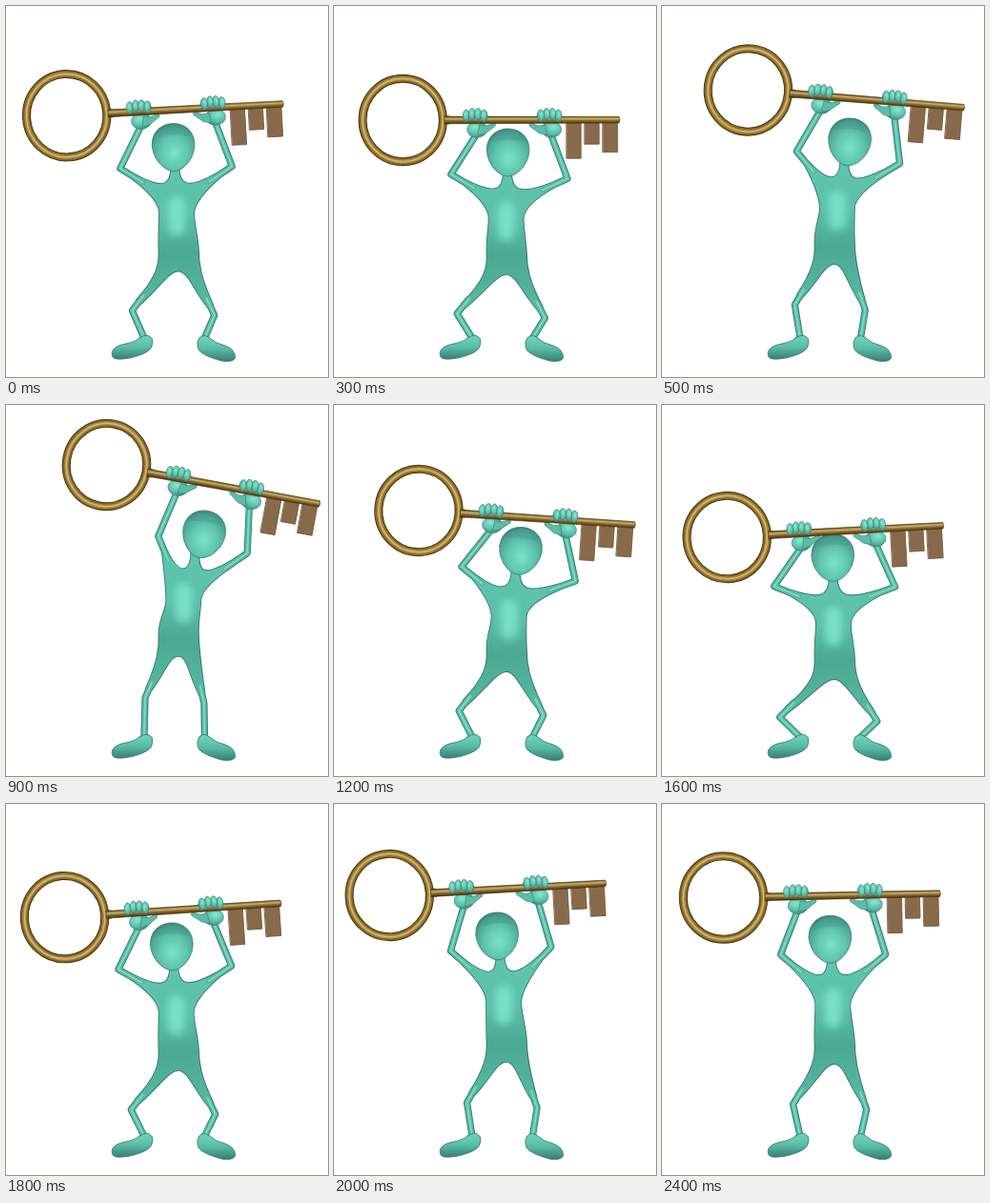
Animation, 338 px wide and 390 px high, one loop 2500 ms. Source, as an HTML page:

```html
<!DOCTYPE html>
<html lang="en">
<head>
<meta charset="utf-8">
<title>Figure lifting a key</title>
<style>
html, body { margin: 0; width: 100%; height: 100%; overflow: hidden; background: #fff; }
svg { display: block; width: 100vw; height: 100vh; }
path, ellipse { stroke-linecap: round; stroke-linejoin: round; }
</style>
</head>
<body>
<svg viewBox="0 0 338 390" fill="none">
  <defs>
    <radialGradient id="skull" cx=".52" cy=".62" r=".62">
      <stop offset="0" stop-color="#7ce2cb"/>
      <stop offset=".5" stop-color="#62c7b1"/>
      <stop offset=".85" stop-color="#4ca797"/>
      <stop offset="1" stop-color="#3a8478"/>
    </radialGradient>
    <linearGradient id="skin" x1="0" y1="0" x2="0" y2="1">
      <stop offset="0" stop-color="#60c5af"/>
      <stop offset=".35" stop-color="#5bbfa9"/>
      <stop offset=".62" stop-color="#4ba893"/>
      <stop offset="1" stop-color="#58b9a4"/>
    </linearGradient>
    <linearGradient id="foot" x1="0" y1="0" x2="0" y2="1">
      <stop offset="0" stop-color="#6fd6bf"/>
      <stop offset=".5" stop-color="#59bca6"/>
      <stop offset="1" stop-color="#387f74"/>
    </linearGradient>
    <radialGradient id="finger" cx=".4" cy=".35" r=".7">
      <stop offset="0" stop-color="#86e9d3"/>
      <stop offset=".6" stop-color="#5cbfaa"/>
      <stop offset="1" stop-color="#3c867b"/>
    </radialGradient>
    <linearGradient id="bronze" x1="0" y1="-4" x2="0" y2="4" gradientUnits="userSpaceOnUse">
      <stop offset="0" stop-color="#4b3a17"/>
      <stop offset=".35" stop-color="#cdb062"/>
      <stop offset=".6" stop-color="#8a6b2f"/>
      <stop offset="1" stop-color="#3a2b10"/>
    </linearGradient>
    <filter id="soft" filterUnits="userSpaceOnUse" x="0" y="0" width="338" height="390">
      <feGaussianBlur stdDeviation="4"/>
    </filter>
  </defs>

  <g stroke="#37796e">
    <path id="limbEdge" stroke-width="7.2"/>
    <path id="bodyEdge" stroke-width="1.8"/>
  </g>
  <path id="body" fill="url(#skin)"/>
  <path id="limbs" stroke="#57b8a3" stroke-width="5.4"/>
  <path id="shine" stroke="#76dac4" stroke-width="2"/>
  <path id="glow" stroke="#7fe6cf" stroke-width="18" opacity=".85" filter="url(#soft)"/>
  <g fill="url(#foot)" stroke="#3a7d73" stroke-width=".9">
    <path d="M140 349Q149 343 153.500 350Q156 361 143 366Q128 372 116 371Q110 370 111.500 363Q114 357 126 355Q136 353 140 349Z"/>
    <path d="M203 349Q207 344 214 349Q220 355 230 357Q241 361 240.500 370Q238 375 226 373Q208 368 202.500 362Q199 354 203 349Z"/>
  </g>
  <g id="head">
    <path d="M-22.300 -2C-22.300 -16 -12 -24 0 -24S22.300 -16 22.300 -2C22.300 13 10 26 0 26S-22.300 13 -22.300 -2Z" fill="url(#skull)" stroke="#3f8076" stroke-width=".8"/>
    <path d="M-17 -10Q-11 -21 2 -21Q14 -20 18 -10Q2 -15 -17 -10Z" fill="#3d8a80" opacity=".3"/>
  </g>

  <g id="key">
    <g id="palms"></g>
    <path d="M57 3H72V40.500H57ZM76 3H91V25.500H76ZM95 3H110.500V34H95Z" fill="#886a4b" stroke="#6c5238" stroke-width=".8"/>
    <g id="ring" transform="translate(-115 0)"></g>
    <path d="M-71 -4.200H-66V-3.800L112 -3.300Q114 0 112 3.300L-66 3.900V4.200H-71Z" fill="url(#bronze)" stroke="#483614" stroke-width=".6"/>
    <g id="fingers"></g>
  </g>
</svg>
<script>
const LOOP = 2500, STEP = 100;
const $ = id => document.getElementById(id);

// Key points of the lift: time, middle of the bar (x, y), tilt in degrees
const lift = [
  [0, 178.5, 109, -3.1], [200, 180, 126, -2], [500, 205, 97.7, 4.6],
  [700, 217, 78, 8.6], [900, 218.6, 83.8, 10.4], [1200, 203.7, 118.6, 3.8],
  [1600, 183, 132.8, -3.1], [2000, 173, 89.6, -3.2], [2400, 179.5, 96.3, -1.1]
];

// Smooth periodic curve through the key points
function liftAt(t) {
  const n = lift.length;
  const at = k => {
    const [time, ...values] = lift[(k + n) % n];
    return { time: time + Math.floor(k / n) * LOOP, values };
  };
  const i = lift.findLastIndex(point => point[0] <= t);
  const [before, from, to, after] = [i - 1, i, i + 1, i + 2].map(at);
  const span = to.time - from.time, u = (t - from.time) / span, v = 1 - u;
  return from.values.map((a, c) => {
    const b = to.values[c];
    const leave = (b - before.values[c]) / (to.time - before.time) * span;
    const arrive = (after.values[c] - a) / (after.time - from.time) * span;
    return a * v * v * (1 + 2 * u) + b * u * u * (3 - 2 * u) + leave * u * v * v - arrive * u * u * v;
  });
}

const mix = (a, b, k) => [a[0] + (b[0] - a[0]) * k, a[1] + (b[1] - a[1]) * k];
const shift = (p, x, y) => [p[0] + x, p[1] + y];
const pt = p => p[0].toFixed(2) + ' ' + p[1].toFixed(2);
const line = (...points) => 'M' + points.map(pt).join('L');
const curve = (a, b, c) => `C${pt(a)} ${pt(b)} ${pt(c)}`;
const quad = (a, b) => `Q${pt(a)} ${pt(b)}`;

// Point on segment a-b pushed sideways by w
function side(a, b, k, w) {
  const dx = b[0] - a[0], dy = b[1] - a[1], len = Math.hypot(dx, dy);
  return shift(mix(a, b, k), -dy / len * w, dx / len * w);
}

// Joint of a two-bone limb from a to b; dir picks the side it bends to
function joint(a, b, upper, lower, dir) {
  const len = Math.hypot(b[0] - a[0], b[1] - a[1]);
  const along = (len * len + upper * upper - lower * lower) / (2 * len);
  const out = Math.sqrt(Math.max(0, upper * upper - along * along));
  return side(a, b, along / len, out * dir);
}

function buildKey() {
  const layers = [['#483614', 9], ['#83652a', 7.2], ['#ab8a43', 4], ['#d4b868', 1.5]];
  $('ring').innerHTML = layers.map(([color, width]) =>
    `<ellipse rx="42.200" ry="43.700" stroke="${color}" stroke-width="${width}"/>`).join('');
  for (const dir of [1, -1]) {
    const place = `<g transform="translate(${-39 * dir} 0) scale(${dir} 1)" stroke="#3f857a" stroke-width=".7">`;
    $('palms').innerHTML += place +
      `<ellipse cx="${2 * dir}" cy="10" rx="10.500" ry="8.500" fill="url(#finger)"/>` +
      '<path d="M5 5Q12 8 18 3.500Q22 3 21 6.500Q16 10 11 14L3 16Z" fill="#5bbda8"/></g>';
    $('fingers').innerHTML += place + [-9.3, -3.1, 3.1, 9.3].map(dx =>
      `<ellipse cx="${dx}" cy="${Math.abs(dx) > 5 ? -4.5 : -6}" rx="3.600" ry="6.300" fill="url(#finger)"/>`
    ).join('') + '</g>';
  }
}

function draw(t) {
  const [x, y, tilt] = liftAt(t);
  const sway = x - 178, drop = y - 83.8;

  // The body follows the bar
  const chest = [178 + sway * .4, 186 + drop * .5];
  const head = [175.3 + sway * .8, chest[1] - 51];
  const neck = [mix(head, chest, .7)[0], chest[1] - 18];
  const h = 264 + drop * .42 - sway * .1;
  const hipL = [166, h + 1], hipR = [196, h + 1], crotch = [181, h + 4];
  const torso = [179 + sway * .18, chest[1] + 16];

  const a = tilt * Math.PI / 180;
  const onKey = (u, v) => [x + u * Math.cos(a) - v * Math.sin(a), y + u * Math.sin(a) + v * Math.cos(a)];
  const wristL = onKey(-37, 14), wristR = onKey(40, 14);
  const shoulderL = shift(chest, -15, -1), shoulderR = shift(chest, 16, -1);
  const elbowL = joint(shoulderL, wristL, 51, 51, -1), elbowR = joint(shoulderR, wristR, 52, 51, 1);

  const bend = h - 260;
  const kneeL = [146 - bend * .93, 308 + bend * .84], kneeR = [208 + bend * .74, 314 + bend * .76];
  const ankleL = [145, 349], ankleR = [208.5, 349];

  const outline = 'M' + pt(shift(neck, 4, -13)) +
    curve(shift(neck, 4, 8), shift(shoulderR, -4, -4), side(shoulderR, elbowR, .65, -2.8)) +
    'L' + pt(side(shoulderR, elbowR, .65, 2.8)) +
    quad(shift(torso, 19, -11), shift(torso, 18, 3)) +
    curve(shift(torso, 18, 14), [201, h - 34], [202, h - 18]) +
    curve([202, h - 4], [204, h + 10], side(hipR, kneeR, .8, -3)) +
    'L' + pt(side(hipR, kneeR, .8, 3)) +
    curve(mix(crotch, kneeR, .42), shift(crotch, 10, 0), crotch) +
    curve(shift(crotch, -10, 0), mix(crotch, kneeL, .42), side(hipL, kneeL, .8, -3)) +
    'L' + pt(side(hipL, kneeL, .8, 3)) +
    curve([159, h + 10], [161.5, h - 4], [160.5, h - 18]) +
    curve([160, h - 34], shift(torso, -18, 14), shift(torso, -18, 3)) +
    quad(shift(torso, -18, -11), side(shoulderL, elbowL, .65, -2.8)) +
    'L' + pt(side(shoulderL, elbowL, .65, 2.8)) +
    curve(shift(shoulderL, 3, -4), shift(neck, -4, 8), shift(neck, -4, -13)) + 'Z';

  const limbs = line(mix(shoulderL, elbowL, .45), elbowL, wristL) +
    line(mix(shoulderR, elbowR, .45), elbowR, wristR) +
    line(mix(hipL, kneeL, .65), kneeL, ankleL) +
    line(mix(hipR, kneeR, .65), kneeR, ankleR);

  for (const id of ['body', 'bodyEdge']) $(id).setAttribute('d', outline);
  for (const id of ['limbs', 'limbEdge', 'shine']) $(id).setAttribute('d', limbs);
  $('glow').setAttribute('d', line(shift(torso, 0, -6), shift(torso, 0, 18)));
  $('head').setAttribute('transform',
    `translate(${pt(head)}) rotate(${((head[0] - neck[0]) * 1.2).toFixed(2)})`);
  $('key').setAttribute('transform', `translate(${x} ${y}) rotate(${tilt})`);
}

function frame() {
  draw(Math.floor(performance.now() % LOOP / STEP) * STEP);
  requestAnimationFrame(frame);
}

buildKey();
frame();
</script>
</body>
</html>
```
